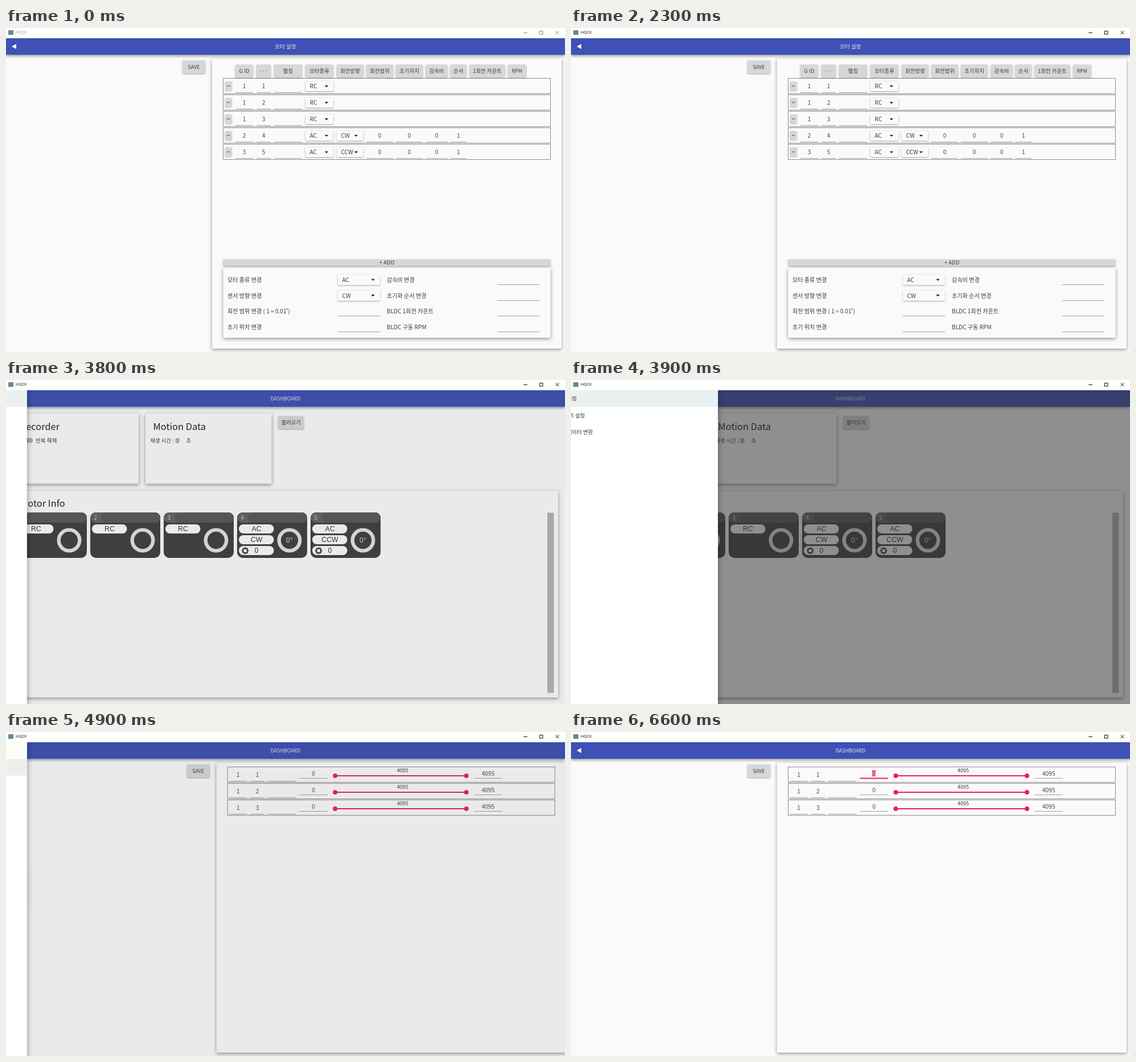
These frames come from a looping animation (982x570 px, 8000 ms). An HTML page with a canvas:

```html
<!DOCTYPE html>
<html lang="ko">
<head>
<meta charset="utf-8">
<title>모터 설정</title>
<style>
html, body { margin: 0; width: 100%; height: 100%; overflow: hidden; background: #fafafa; }
canvas { display: block; width: 982px; height: 570px; }
</style>
</head>
<body>
<canvas id="stage" width="982" height="570"></canvas>
<script>
const W = 982, H = 570, LOOP = 8000;
const KR = '"Noto Sans CJK KR", "Noto Sans CJK", sans-serif';
const ARIAL = '"Liberation Sans", sans-serif';
const INK = '#3a3a3a', GREY = '#d6d7d7', PAPER = '#fafafa', PINK = '#e91e63', BLUE = '#3f51b5';
const DRAWER_W = 295;

const stage = document.getElementById('stage').getContext('2d');
let g = stage;

function rect(x, y, w, h, color) {
  g.fillStyle = color;
  g.fillRect(x, y, w, h);
}

function round(x, y, w, h, r, color) {
  g.fillStyle = color;
  g.beginPath();
  g.roundRect(x, y, w, h, r);
  g.fill();
}

function disc(x, y, r, color) {
  g.fillStyle = color;
  g.beginPath();
  g.arc(x, y, r, 0, 7);
  g.fill();
}

function poly(color, ...points) {
  g.fillStyle = color;
  g.beginPath();
  points.forEach(([x, y]) => g.lineTo(x, y));
  g.fill();
}

function line(x1, y1, x2, y2, color, width = 1) {
  g.strokeStyle = color;
  g.lineWidth = width;
  g.beginPath();
  g.moveTo(x1, y1);
  g.lineTo(x2, y2);
  g.stroke();
}

function text(s, x, y, size, { align = 'left', color = INK, font = KR, weight = 400 } = {}) {
  g.font = `${weight} ${size}px ${font}`;
  g.textAlign = align;
  g.textBaseline = 'middle';
  g.fillStyle = color;
  g.fillText(s, x, y);
}

const center = (s, x, y, size, opts) => text(s, x, y, size, { align: 'center', ...opts });

function raised(blur, dy, alpha, draw) {
  g.save();
  g.shadowColor = `rgba(0,0,0,${alpha})`;
  g.shadowBlur = blur;
  g.shadowOffsetY = dy;
  draw();
  g.restore();
}

const panel = (x, y, w, h) => raised(6, 2, .42, () => round(x, y, w, h, 1, PAPER));

function button(label, x, y, w, h, size = 9.4) {
  raised(3, 1, .35, () => round(x, y, w, h, 1.5, GREY));
  center(label, x + w / 2, y + h / 2, size);
}

function combo(label, x, y, w, h, arrowX) {
  raised(3, 1, .35, () => round(x, y, w, h, 1.5, PAPER));
  const cy = y + h / 2;
  text(label, x + 7.5, cy, 10.1);
  poly('#222', [arrowX - 3.2, cy - 1.6], [arrowX + 3.2, cy - 1.6], [arrowX, cy + 1.8]);
}

const underline = (x, w, y) => line(x, y, x + w, y, '#a0a0a0');

function field(value, x, w, textY, lineY) {
  underline(x, w, lineY);
  center(value, x + w / 2, textY, 10.2, { color: '#444' });
}

function rowFrame(y) {
  g.strokeStyle = '#8c8c8c';
  g.lineWidth = 1;
  g.strokeRect(381.5, y, 575, 27);
}

function layer(draw) {
  const c = document.createElement('canvas');
  c.width = W;
  c.height = H;
  g = c.getContext('2d');
  draw();
  g = stage;
  return c;
}

function splitPage() {
  button('SAVE', 310, 57, 40, 23, 9);
  panel(362, 54, 614, 510);
}

const settings = layer(() => {
  splitPage();
  const cols = [
    ['G ID', 403, 31], ['···', 440, 25], ['별칭', 471, 49], ['모터종류', 526, 49],
    ['회전방향', 581, 47], ['회전범위', 633, 47], ['초기위치', 685, 47], ['감속비', 737.5, 38],
    ['순서', 780.5, 28.5], ['1회전 카운트', 814.5, 62], ['RPM', 882, 31.5]
  ];
  cols.forEach(([label, x, w]) => button(label, x, 64.5, w, 22.5, label === 'RPM' ? 8.7 : 9.4));

  const motors = [[1, 'RC'], [1, 'RC'], [1, 'RC'], [2, 'AC', 'CW'], [3, 'AC', 'CCW']];
  motors.forEach(([group, type, dir], i) => {
    const y = 88.5 + 29 * i, mid = y + 14;
    rowFrame(y);
    raised(2, .5, .25, () => round(384.5, y + 5.5, 12.5, 17, 3, GREY));
    line(388.3, mid - .5, 393.3, mid - .5, INK);
    const cell = (value, col) => field(value, cols[col][1], cols[col][2], mid, y + 25);
    cell(group, 0);
    cell(i + 1, 1);
    cell('', 2);
    combo(type, 526, y + 5.5, 49, 17, 563);
    if (dir) {
      combo(dir, 581, y + 5.5, 46.5, 17, 615);
      ['0', '0', '0', '1'].forEach((v, k) => cell(v, 5 + k));
    }
  });

  button('+ ADD', 381.5, 407, 575, 11.5, 9.6);
  panel(381.5, 422, 575, 123);
  const left = ['모터 종류 변경', '센서 방향 변경', '회전 범위 변경 ( 1 = 0.01˚)', '초기 위치 변경'];
  const right = ['감속비 변경', '초기화 순서 변경', 'BLDC 1회전 카운트', 'BLDC 구동 RPM'];
  left.forEach((label, i) => {
    const y = 443 + 27.7 * i, base = Math.floor(y + 8.5) + .5;
    text(label, 389, y, 10.1);
    text(right[i], 669, y, 10.1);
    underline(863, 74, base);
    if (i < 2) combo(i ? 'CW' : 'AC', 583, y - 9, 74, 18, 644.5);
    else underline(583, 74, base);
  });
});

function gear(x, y) {
  g.strokeStyle = '#444';
  g.lineWidth = 2.4;
  g.beginPath();
  g.arc(x, y, 4, 0, 7);
  g.stroke();
  for (let i = 0; i < 8; i++) {
    const c = Math.cos(i * Math.PI / 4), s = Math.sin(i * Math.PI / 4);
    line(x + c * 4.5, y + s * 4.5, x + c * 6.3, y + s * 6.3, '#444', 2.2);
  }
}

function motorCard(i, lines) {
  const x = 19 + 129 * i;
  round(x, 233, 123, 80, 10, '#434041');
  round(x, 233, 123, 18, 9, '#636464');
  round(x + 19, 233, 104, 18, 9, '#575a5a');
  text(i + 1, x + 6.5, 242.5, 9.8, { color: '#d0d0d0' });
  lines.forEach((s, k) => {
    const y = 254 + 19 * k;
    round(x + 3, y, 61.5, 16, 8, PAPER);
    center(s, x + 34, y + 8.7, 12.3, { font: ARIAL, color: '#333' });
  });
  g.strokeStyle = '#dfe3e1';
  g.lineWidth = 6.3;
  g.beginPath();
  g.arc(x + 92, 282, 18.3, 0, 7);
  g.stroke();
  if (lines.length > 1) {
    gear(x + 14.2, 300.3);
    center('0°', x + 92, 282.5, 12.3, { font: ARIAL, color: '#d8dcda' });
  }
}

const dashboard = layer(() => {
  const title = (s, x, y) => text(s, x, y, 16.4, { weight: 300, color: '#222' });
  panel(12, 59, 221, 123.5);
  title('Recorder', 25, 82);
  round(25, 102, 22.5, 8.5, 4.2, '#b1b1b1');
  raised(3, 1, .4, () => disc(30, 106.3, 6.2, PAPER));
  text('반복 해제', 52, 106, 9.6);

  panel(245, 59, 221.5, 123.5);
  title('Motion Data', 258.5, 82);
  text('재생 시간 : 분', 253, 106, 9.5);
  text('초', 316.5, 106, 9.5);
  button('불러오기', 478.5, 63.5, 44.5, 22.5, 9.3);

  panel(12, 195, 958, 363.5);
  title('Motor Info', 25, 217);
  [['RC'], ['RC'], ['RC'], ['AC', 'CW', '0'], ['AC', 'CCW', '0']].forEach((l, i) => motorCard(i, l));
  rect(951, 233.5, 11.5, 317, '#b2b2b2');
});

const ranges = layer(() => {
  splitPage();
  for (let i = 0; i < 3; i++) {
    const y = 61.5 + 29 * i;
    rowFrame(y - .5 + .5);
    field(1, 384.5, 31, y + 13.7, y + 25);
    field(i + 1, 421.5, 24.5, y + 13.7, y + 25);
    underline(452, 49.5, y + 25);
    field(0, 507.5, 49.5, y + 11.3, y + 20);
    center('4095', 689, y + 5.8, 9);
    line(570.5, y + 15.6, 801, y + 15.6, PINK, 2);
    disc(570.5, y + 15.6, 4, PINK);
    disc(801, y + 15.6, 4, PINK);
    field('4095', 814.5, 49.5, y + 11.3, y + 20);
  }
});

function titleBar(active) {
  rect(0, 0, W, 18, '#fff');
  rect(4, 4, 9, 8, '#5b8f90');
  const ink = active ? '#111' : '#888';
  text('HQOI', 17, 8.5, 7.4, { font: '"Open Sans", sans-serif', color: active ? '#111' : '#999' });
  line(909, 8.5, 916, 8.5, ink);
  g.strokeStyle = ink;
  g.strokeRect(937.5, 5.5, 5.5, 5.5);
  line(965.5, 5, 971.5, 11, ink);
  line(971.5, 5, 965.5, 11, ink);
}

function toolBar(title, menu) {
  raised(5, 2, .45, () => rect(0, 18, W, 29, BLUE));
  if (menu) [29, 32.7, 36.4].forEach(y => line(9, y, 19.3, y, '#fff', 2));
  else poly('#fff', [10, 32.5], [18, 28], [18, 37]);
  center(title, 491, 32.7, title === 'DASHBOARD' ? 8.9 : 9.5, { color: '#e4e7f6' });
}

function drawer(pos, t) {
  if (pos <= 0) return;
  rect(0, 18, W, H - 18, `rgba(48,48,48,${.6 * pos})`);
  g.save();
  g.beginPath();
  g.rect(0, 18, W, H - 18);
  g.clip();
  g.translate((pos - 1) * DRAWER_W, 0);
  raised(10, 0, .4, () => rect(0, 18, DRAWER_W, H, '#fff'));
  rect(0, 18, DRAWER_W, 29.3, t < 4000 ? '#ebf0f0' : '#fcfef8');
  if (t >= 4700) {
    rect(0, 47.3, DRAWER_W, 29.4, '#eee');
    if (t < 4900) {
      g.save();
      g.beginPath();
      g.rect(0, 47.3, DRAWER_W, 29.4);
      g.clip();
      disc(70, 62, t < 4800 ? 20 : 55, '#e2e2e2');
      g.restore();
    }
  }
  ['모터 설정', 'RC 범위 설정', '모션 데이터 변환'].forEach((s, i) => text(s, 10, 32.7 + 29.4 * i, 9.5));
  g.restore();
}

const progress = (t, start) => Math.min(1, Math.max(0, (t - start) / 200));
const outCubic = p => 1 - (1 - p) ** 3;
const inOutQuad = p => p < .5 ? 2 * p * p : 1 - 2 * (1 - p) ** 2;

function page(img, shift, alpha) {
  if (alpha <= 0) return;
  g.globalAlpha = alpha;
  g.drawImage(img, shift * W / 2, 0);
  g.globalAlpha = 1;
}

function render(t) {
  const back = outCubic(progress(t, 2350));
  const push = outCubic(progress(t, 4750));
  const open = inOutQuad(progress(t, 3750)) - inOutQuad(progress(t, 4750));

  rect(0, 0, W, H, PAPER);
  if (t < 4000) {
    page(dashboard, back - 1, back);
    page(settings, back, 1 - back);
  } else {
    page(dashboard, -push, 1 - push);
    page(ranges, 1 - push, push);
  }
  if (t >= 6600) {
    rect(529, 67.5, 6, 10.5, PINK);
    center('0', 532.2, 72.8, 10.2, { color: '#fff' });
    line(507.5, 81.5, 557, 81.5, PINK, 2);
  }
  toolBar(back > 0 ? 'DASHBOARD' : '모터 설정', back > 0 && push === 0);
  drawer(open, t);
  titleBar(t >= 2200);
}

const begin = performance.now();
function tick() {
  const t = (performance.now() - begin) % LOOP;
  render(Math.floor(t / 100) * 100);
  requestAnimationFrame(tick);
}
tick();
</script>
</body>
</html>
```
